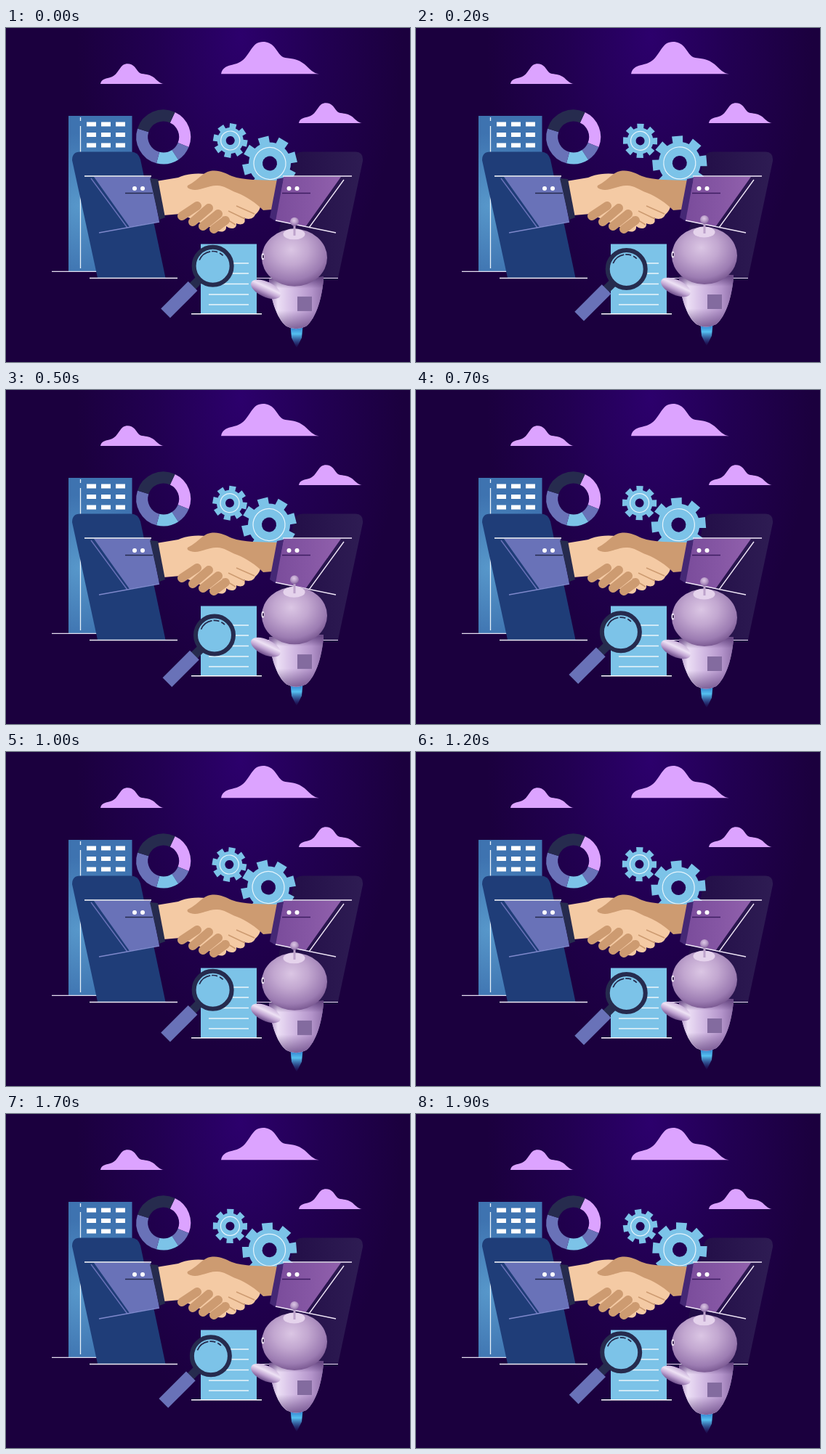
These frames come from a looping animation (556 px wide and 460 px high, 2 s). An HTML page:

```html
<!DOCTYPE html>
<html lang="en">
<head>
<meta charset="utf-8">
<title>Handshake and robot</title>
<style>
  html, body { margin: 0; width: 100%; height: 100%; overflow: hidden; background: #1b003e; }
  svg { display: block; width: 556px; height: 460px; }
</style>
</head>
<body>
<svg viewBox="0 0 556 460">
  <defs>
    <radialGradient id="glow" gradientUnits="userSpaceOnUse" cx="0" cy="0" r="1" gradientTransform="translate(322 10) scale(225 400)">
      <stop offset="0" stop-color="#2c006c"/><stop offset=".5" stop-color="#220052"/><stop offset="1" stop-color="#1b003e"/>
    </radialGradient>
    <radialGradient id="tower" gradientUnits="userSpaceOnUse" cx="100" cy="245" r="100">
      <stop offset="0" stop-color="#5797ca"/><stop offset="1" stop-color="#3e73b0"/>
    </radialGradient>
    <linearGradient id="panel"><stop offset="0" stop-color="#200b45"/><stop offset="1" stop-color="#2e1c53"/></linearGradient>
    <linearGradient id="sleeve"><stop offset="0" stop-color="#7a4c9b"/><stop offset="1" stop-color="#9060ac"/></linearGradient>
    <radialGradient id="head" cx=".45" cy=".36" r=".66">
      <stop offset="0" stop-color="#dbc6e4"/><stop offset=".4" stop-color="#c2a7d0"/><stop offset=".8" stop-color="#9c7cb2"/><stop offset="1" stop-color="#77568f"/>
    </radialGradient>
    <linearGradient id="body">
      <stop offset="0" stop-color="#a284bb"/><stop offset=".16" stop-color="#ecdff5"/><stop offset=".45" stop-color="#d2bae3"/><stop offset=".78" stop-color="#b394ca"/><stop offset="1" stop-color="#9070aa"/>
    </linearGradient>
    <linearGradient id="shade" x2="0" y2="1">
      <stop offset="0" stop-color="#553572" stop-opacity=".8"/><stop offset=".22" stop-color="#553572" stop-opacity="0"/>
      <stop offset=".65" stop-color="#553572" stop-opacity="0"/><stop offset="1" stop-color="#553572" stop-opacity=".65"/>
    </linearGradient>
    <linearGradient id="arm" x2="0" y2="1"><stop offset="0" stop-color="#c7aed7"/><stop offset=".35" stop-color="#eee2f5"/><stop offset=".65" stop-color="#c0a4d2"/><stop offset="1" stop-color="#6d4d8a"/></linearGradient>
    <linearGradient id="flame" x2="0" y2="1"><stop offset="0" stop-color="#2d75c8"/><stop offset=".35" stop-color="#55c0f0"/><stop offset="1" stop-color="#2d64b8" stop-opacity="0"/></linearGradient>
    <path id="cloud" fill="#dca3ff" d="M0 28C1 22 6 21 12 19.500C23 17 24 8 31 2C36-1 43 0 47 4.500C51 9 52 13 57 14C64 15 68 15 74 19.500C79 24 82 27.500 87 28Z"/>
  </defs>

  <rect width="556" height="460" fill="url(#glow)"/>
  <use href="#cloud" x="130" y="49"/>
  <use href="#cloud" x="403" y="103"/>
  <use href="#cloud" transform="translate(296 18.500) scale(1.55 1.6)"/>

  <!-- building -->
  <rect x="86" y="121" width="87.500" height="214" fill="url(#tower)"/>
  <path d="M102.500 123v5M102.500 135V331" stroke="#e8f2fa" stroke-width="1.300"/>
  <path d="M111 132.500h54M111 147h54M111 161.500h54" stroke="#fff" stroke-width="6" stroke-dasharray="13 7"/>
  <path d="M63 335.300H126" stroke="#e5e0f0" stroke-width="1.200"/>
  <path d="M91 182Q91 170.500 102 170.500H172Q182 170.500 185 181L219.500 344H126Z" fill="#1f3d78"/>
  <path d="M115 344.500H236" stroke="#f0edf6" stroke-width="1.300"/>

  <path d="M396 181Q398 170.500 408 170.500H481Q492 170.500 491 183L457 344H362Z" fill="url(#panel)"/>
  <path d="M345 344.500H457" stroke="#e5e0f0" stroke-width="1.200"/>
  <g id="donut" fill="none" stroke-width="16"></g>
  <g id="bigGear"></g>
  <g id="smallGear"></g>

  <!-- hands -->
  <path d="M207 211L237 206C250 200 269 199 285 203L350 238C352 246 348 253 343 257C340 264 332 264 327 261C332 268 325 273 317 269C318 277 309 278 303 273C304 280 296 283 289 278L240 256L217 258Z" fill="#f4caa4"/>
  <path d="M250 217C263 211 270 199 281 197C294 195 301 200 311 204C327 210 350 209 374 210L366 250L354 251C344 241 331 232 318 227C307 223 300 217 291 217C278 216 266 226 254 222Q248 220 250 217Z" fill="#cd9b71"/>
  <path d="M263 245L242 259M279 248L257 267M292 256L271 273M302 265L286 277" stroke="#cd9b71" stroke-linecap="round" stroke-width="12"/>
  <path d="M317 245L342 256M306 252L329 263M298 260L316 271" stroke="#cd9b71" stroke-width="1.600"/>

  <!-- left sleeve -->
  <path d="M121 205H199L211 266.500L170 274Z" fill="#6972b8"/>
  <path d="M198 207L209 208L219 261L211 264Z" fill="#262b4e"/>
  <path d="M117 207L167 275" stroke="#6972b8" stroke-width="1.500"/>
  <path d="M164 227.500H202" stroke="#262b4e" stroke-width="1.300"/>
  <path d="M108 204H200" stroke="#fff" stroke-width="1.500"/>
  <path d="M128 282L211 267" stroke="#7e88cb" stroke-width="1.300"/>

  <!-- right sleeve -->
  <path d="M382 205H461L412 274L370 265Z" fill="url(#sleeve)"/>
  <path d="M373 208L382 206L371 266L363 261Z" fill="#452875"/>
  <path d="M380 227.500H419" stroke="#3d1d62" stroke-width="1.300"/>
  <path d="M381 204H476M465 209L417 275M371 265L454 282" stroke="#eee5f6" stroke-width="1.400"/>
  <g fill="#fff"><circle cx="177" cy="221" r="3"/><circle cx="188" cy="221" r="3"/><circle cx="389.500" cy="221" r="3"/><circle cx="400.500" cy="221" r="3"/></g>

  <!-- document -->
  <rect x="268" y="297.500" width="77" height="96" fill="#7cc3e8"/>
  <path d="M279 324H334M279 338H334M279 352.500H334M279 367H334M279 381H334" stroke="#eaf6fc" stroke-width="1.300"/>
  <path d="M255 393.700H352" stroke="#fff" stroke-width="1.400"/>

  <g id="magnifier">
    <g transform="rotate(45)">
      <rect x="-6" y="27" width="12" height="14" fill="#262b4e"/>
      <rect x="-9" y="39" width="18" height="53" fill="#6972b8"/>
    </g>
    <circle r="26" fill="#7cc3e8" stroke="#262b4e" stroke-width="6"/>
    <path d="M-18.500-8A20 20 0 0 1 14-14.500" fill="none" stroke="#262b4e" stroke-width="1.700" stroke-dasharray="20 2 8 3"/>
  </g>

  <g id="robot">
    <path d="M391.500 408H408.500L407 424L400 438L393 424Z" fill="url(#flame)"/>
    <g id="torso">
      <path id="hull" d="M362 343C363 366 372 398 386 408Q399 415 413 408C427 397 436 366 437 340Z" fill="url(#body)"/>
      <use href="#hull" style="fill:url(#shade)"/>
      <path d="M362 343C363 366 372 398 386 408Q399 415 413 408C427 397 436 366 437 340Z" fill="url(#shade)"/>
    </g>
    <ellipse cx="397" cy="313.500" rx="45" ry="39.500" fill="url(#head)"/>
    <ellipse cx="396.500" cy="281" rx="15" ry="7.500" fill="#e5d3ec"/>
    <path d="M397 268V283" stroke="#bda2cb" stroke-width="3"/>
    <circle cx="397" cy="264" r="6" fill="url(#head)"/>
    <ellipse cx="353.500" cy="312" rx="2" ry="4.500" fill="#f2e9f7"/>
    <ellipse cx="354" cy="312" rx="1" ry="2.500" fill="#372150"/>
    <ellipse rx="22" ry="10.500" transform="translate(357.500 357) rotate(25)" fill="url(#arm)"/>
    <rect x="401" y="367" width="20" height="20" fill="#836b9f"/>
  </g>
</svg>
<script>
const LOOP = 2000, STEP = 100, TAU = Math.PI * 2;
const byId = id => document.getElementById(id);
const polar = (r, a) => [r * Math.cos(a), r * Math.sin(a)].map(v => v.toFixed(2)).join(" ");
const place = (id, x, y, turn = 0) =>
  byId(id).setAttribute("transform", `translate(${x} ${y}) rotate(${turn})`);

function drawGear(id, outer, body, hole, ring) {
  let d = "";
  for (let i = 0; i < 8; i++) {
    const a = i * TAU / 8;
    const points = [[body, -.24], [outer, -.2], [outer, .2], [body, .24]];
    points.forEach(([r, offset], k) => d += (i || k ? "L" : "M") + polar(r, a + offset));
    d += `A${body} ${body} 0 0 1 ${polar(body, a + TAU / 8 - .24)}`;
  }
  byId(id).innerHTML = `<path d="${d}Z" fill="#7cc3e8"/>
    <circle r="${ring}" fill="none" stroke="#e4f4fc" stroke-width="1.2"/>
    <circle r="${hole}" fill="#210052"/>`;
}

function drawDonut() {
  const slices = [[-65, 22, "#dca3ff"], [22, 57, "#6972b8"], [57, 105, "#7cc3e8"],
                  [105, 198, "#6972b8"], [198, 295, "#262b4e"]];
  byId("donut").innerHTML = slices.map(([from, to, color]) =>
    `<path d="M${polar(29.5, from * TAU / 360)}A29.5 29.5 0 0 1 ${polar(29.5, to * TAU / 360)}" stroke="${color}"/>`).join("");
  place("donut", 216.7, 150);
}

function render(now) {
  const t = Math.floor(now % LOOP / STEP) * STEP;
  const spin = t / LOOP * TAU, degrees = t / LOOP * 360;
  const bob = (t + 50) / 1000 * TAU, sway = (t + 30) / 1000 * TAU;
  place("bigGear", 362 + Math.cos(spin), 186.5 - Math.sin(spin), -14 - degrees);
  place("smallGear", 308 + .7 * Math.cos(spin), 155 + .7 * Math.sin(spin), 10 + degrees);
  place("magnifier", 285.8 - 2 * Math.cos(sway) + 4.2 * Math.sin(sway), 332.7 - 5 * Math.cos(sway));
  place("robot", 0, 3 * Math.cos(bob));
  requestAnimationFrame(() => render(performance.now()));
}

drawDonut();
drawGear("bigGear", 38, 29, 10, 22);
drawGear("smallGear", 24, 18, 6, 13);
render(0);
</script>
</body>
</html>
```
